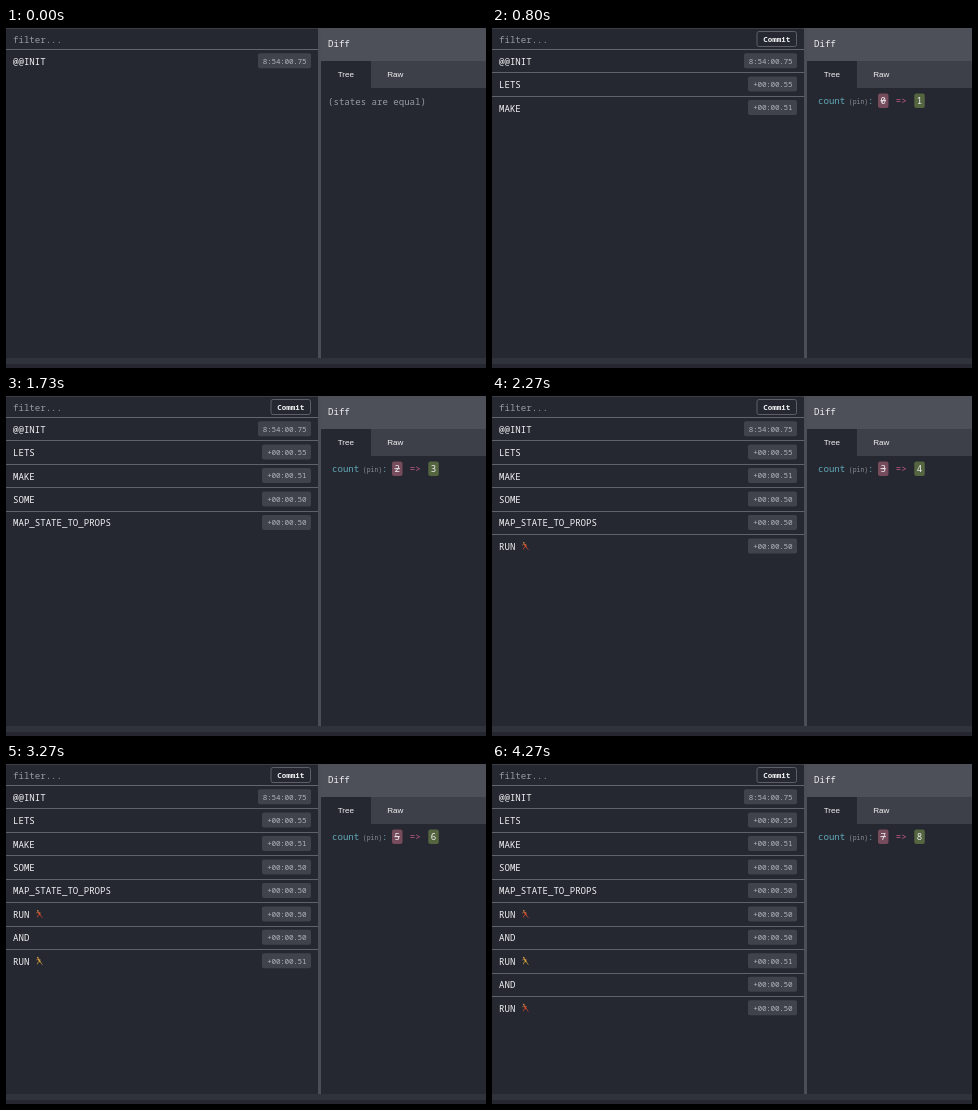
An HTML page for the animation above (4740 ms loop, 480 px wide and 340 px high).

```html
<!DOCTYPE html>
<html>
<head>
<meta charset="utf-8">
<style>
html, body { margin: 0; width: 100%; height: 100%; overflow: hidden; background: #252830; }
svg { display: block; width: 480px; height: 340px; }
text { font: 9.07px "Noto Sans Mono", monospace; fill: #f0f1f3; white-space: pre; }
.dim { fill: #989ba2; }
.time { font-size: 7.7px; letter-spacing: -.27px; fill: #b0b2b8; text-anchor: end; }
.commit { font-size: 7.5px; font-weight: 600; text-anchor: middle; }
.tab { font: 8.1px "Liberation Sans", Arial, sans-serif; }
.key { fill: #62a9b9; }
.type { font-size: 6.45px; fill: #8b8e96; }
.digit { text-anchor: middle; }
.old { text-decoration: line-through; }
.arrow { fill: #c55a91; font-weight: 500; }
</style>
</head>
<body>
<svg viewBox="0 0 480 340">
  <rect width="480" height="340" fill="#252830"/>
  <rect width="313" height="1" fill="#3b3e47"/>
  <rect y="21" width="313" height="1" fill="#62656c"/>
  <rect x="315" width="165" height="33" fill="#4d5058"/>
  <rect x="365" y="33" width="115" height="27" fill="#3d4048"/>
  <rect x="312" width="3" height="330" fill="#4b4e56"/>
  <rect y="330" width="480" height="6" fill="#30333c"/>
  <rect y="336" width="480" height="4" fill="#262631"/>
  <text x="7" y="14.7" class="dim">filter...</text>
  <text x="322" y="19.2">Diff</text>
  <text x="331.7" y="49" class="tab">Tree</text>
  <text x="381.2" y="49" class="tab">Raw</text>
  <g id="commit">
    <rect x="265" y="3.5" width="39.5" height="15" rx="2" fill="#252830" stroke="#5c5f67"/>
    <text x="284.7" y="13.6" class="commit">Commit</text>
  </g>
  <g id="rows"></g>
  <g id="diff"></g>
</svg>
<script>
const LOOP = 4740, PITCH = 23.45;
// [time it appears, label, timestamp, runner colour]
const actions = [
  [0, '@@INIT', '8:54:00.75'],
  [270, 'LETS', '+00:00.55'],
  [730, 'MAKE', '+00:00.51'],
  [1270, 'SOME', '+00:00.50'],
  [1730, 'MAP_STATE_TO_PROPS', '+00:00.50'],
  [2270, 'RUN', '+00:00.50', '#d9482f'],
  [2730, 'AND', '+00:00.50'],
  [3270, 'RUN', '+00:00.51', '#d9a83a'],
  [3800, 'AND', '+00:00.50'],
  [4200, 'RUN', '+00:00.50', '#d9482f']
];
const [commit, rows, diff] = ['commit', 'rows', 'diff'].map(id => document.getElementById(id));

const text = (x, y, s, cls = '') => `<text x="${x}" y="${y}" class="${cls}">${s}</text>`;
const box = (x, y, w, h, fill, r = 2) =>
  `<rect x="${x}" y="${y}" width="${w}" height="${h}" rx="${r}" fill="${fill}"/>`;
const chip = (x, n, fill, cls = '') => box(x, 65.5, 10.5, 14.5, fill) + text(x + 5.2, 76, n, 'digit ' + cls);

const runner = (y, color) => `<g transform="translate(29.3 ${y - 4.8})" fill="none" stroke-linecap="round">
  <path d="M3 2.4L4.6 4.8" stroke="${color}" stroke-width="1.4"/>
  <path d="M1 3.4L3 2.4L5.2 3.2" stroke="#b57a48" stroke-width=".6"/>
  <path d="M4.4 4.8L2.6 5.8L2.2 7.4M4.6 4.8L6.8 7.8" stroke="${color}" stroke-width=".7"/>
  <circle cx="2.4" cy="1" r=".8" fill="#cf9a55"/></g>`;

function row([, label, time, color], i) {
  const y = 33.25 + i * PITCH, w = time.length > 9 ? 53 : 49;
  const line = i ? box(0, Math.round(y - 12.3), 312, 1, '#5f626a', 0) : '';
  return line + text(7, y + 3.4, label) + (color ? runner(y, color) : '') +
    box(305 - w, y - 8.1, w, 15, '#40434c') + text(300.3, y + 2.3, time, 'time');
}

function diffView(count) {
  if (count < 0) return text(322, 76.7, '(states are equal)', 'dim');
  const key = text(326, 76, 'count', 'key') + text(356.8, 76, '(pin)', 'type') + text(376, 76, ':', 'key');
  return key + (count === 0 ? chip(386, 0, '#546540') :
    chip(386, count - 1, '#764b5b', 'old') + text(403.7, 76, '=&gt;', 'arrow') + chip(422.3, count, '#546540'));
}

const rowMarkup = actions.map(row);
let shown = 0;

function draw(now) {
  const t = now % LOOP;
  const n = actions.filter(a => a[0] <= t).length;
  if (n !== shown) {
    shown = n;
    rows.innerHTML = rowMarkup.slice(0, n).join('');
    diff.innerHTML = diffView(n - 2);
  }
  // The button flips open around its horizontal axis
  const open = t < 270 ? 0 : t < 330 ? 0.3 : t < 400 ? 0.8 : 1;
  commit.setAttribute('opacity', open);
  commit.setAttribute('transform', `translate(0 11) scale(1 ${Math.sin(open * Math.PI / 2)}) translate(0 -11)`);
  requestAnimationFrame(draw);
}
draw(performance.now());
</script>
</body>
</html>
```
